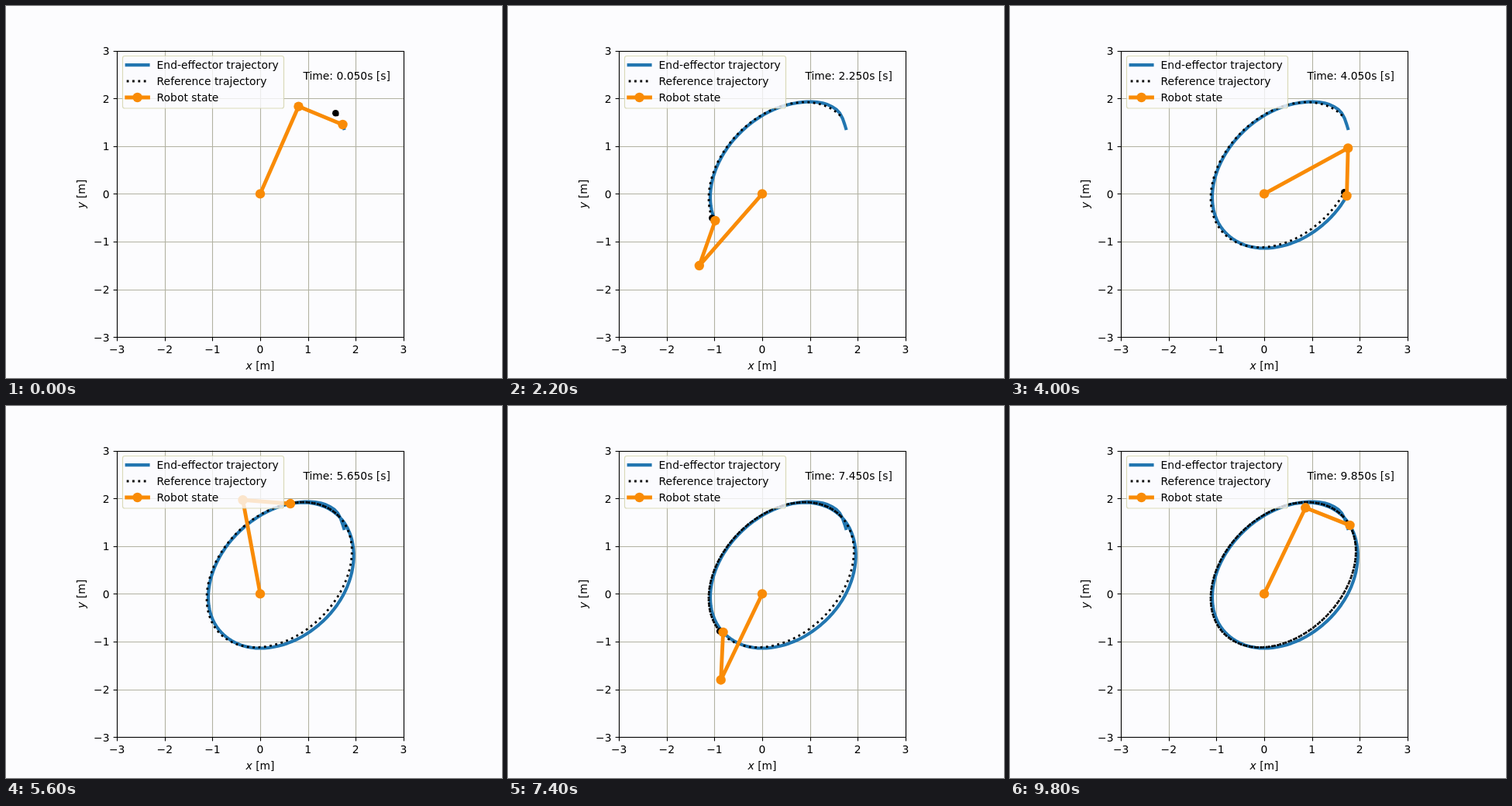
An HTML page with a canvas that plays this animation: 640x480 px, repeating every 10 s.

```html
<!DOCTYPE html>
<html lang="en">
<head>
<meta charset="utf-8">
<title>Two-link arm tracking an ellipse</title>
<style>
  html, body { margin: 0; width: 100%; height: 100%; overflow: hidden; background: #fcfcfe; }
  canvas { display: block; }
</style>
</head>
<body>
<canvas id="stage" width="640" height="480"></canvas>
<script>
const ctx = document.getElementById('stage').getContext('2d');
const PAPER = '#fcfcfe', BLUE = '#2276b0', ORANGE = '#f98b06', GRID = '#b2b2a2';
const SCALE = 61.6, CX = 328, CY = 242.4;      // pixels per metre, axes origin
const LEFT = 143.2, RIGHT = 512.8, TOP = 57.6, BOTTOM = 427.2;
const LOOP = 10000, STEP = 200, LAP = 5, DT = 0.05;
const FONT = '13.89px "DejaVu Sans", sans-serif';
const DOTS = [2.78, 4.58];

const toX = x => CX + SCALE * x;
const toY = y => CY - SCALE * y;
const snap = v => Math.round(v) + 0.5;

// Tracking error in pixels: [time, outward, along the path]
const startup = [[0, -6.6, -16.7], [.05, -5.4, -16.5], [.15, .6, -12], [.25, 2, -10.1],
                 [.35, 1.8, -7.4], [.45, .8, -4]];
const steady = [[.65, -.5, -1.8], [1.45, -1.3, 5.2], [2.45, -2.4, 4], [3.05, 1.2, -1.2],
                [3.55, 4.6, -2.3], [4.05, 5.1, -2.5], [4.85, .3, -1.2]];
const shifted = laps => steady.map(([t, n, s]) => [t + laps * LAP, n, s]);
const errorKeys = [...startup, ...steady, ...shifted(1), ...shifted(2)];

function slope(i, c) {
  const a = errorKeys[Math.max(i - 1, 0)], b = errorKeys[i + 1];
  return (b[c] - a[c]) / (b[0] - a[0]);
}

// Cubic Hermite interpolation of one error component
function trackingError(t, c) {
  let i = 0;
  while (errorKeys[i + 1][0] <= t) i++;
  const a = errorKeys[i], b = errorKeys[i + 1], h = b[0] - a[0], u = (t - a[0]) / h;
  return a[c] * (1 + 2 * u) * (1 - u) ** 2 + b[c] * u * u * (3 - 2 * u)
    + h * u * (1 - u) * (slope(i, c) * (1 - u) - slope(i + 1, c) * u);
}

// Ellipse with semi-axes 1.75 and 1.25, turned by 45 degrees
function reference(t) {
  const phase = 2 * Math.PI * t / LAP;
  const a = 1.75 * Math.SQRT1_2, b = 1.25 * Math.SQRT1_2;
  const cos = Math.cos(phase), sin = Math.sin(phase);
  const dx = -a * sin - b * cos, dy = a * sin - b * cos, speed = Math.hypot(dx, dy);
  return {
    x: toX(.4 + a * cos - b * sin),
    y: toY(.4 + a * cos + b * sin),
    tx: dx / speed, ty: dy / speed
  };
}

function endEffector(t) {
  const { x, y, tx, ty } = reference(t);
  const out = trackingError(t, 1), along = trackingError(t, 2);
  return { x: x + along * tx - out * ty, y: y + along * ty + out * tx };
}

// Inverse kinematics for links of 2 m and 1 m
function elbow(tip) {
  const x = (tip.x - CX) / SCALE, y = (CY - tip.y) / SCALE, r = Math.hypot(x, y);
  const angle = Math.atan2(y, x) + Math.acos(Math.min(1, (r * r + 3) / (4 * r)));
  return { x: toX(2 * Math.cos(angle)), y: toY(2 * Math.sin(angle)) };
}

function line(points, color, width, { dash = [], cap = 'butt' } = {}) {
  ctx.beginPath();
  points.forEach(p => ctx.lineTo(p.x, p.y));
  ctx.strokeStyle = color;
  ctx.lineWidth = width;
  ctx.lineCap = cap;
  ctx.lineJoin = 'round';
  ctx.setLineDash(dash);
  ctx.stroke();
  ctx.setLineDash([]);
}

const segment = (x1, y1, x2, y2, color, width, style) =>
  line([{ x: x1, y: y1 }, { x: x2, y: y2 }], color, width, style);

function disc({ x, y }, radius, color) {
  ctx.beginPath();
  ctx.arc(x, y, radius, 0, 2 * Math.PI);
  ctx.fillStyle = color;
  ctx.fill();
}

function text(string, x, y, align = 'left') {
  ctx.font = FONT;
  ctx.fillStyle = '#000';
  ctx.textAlign = align;
  ctx.fillText(string, x, y);
}

function axisLabel(letter, x, y, angle) {
  ctx.save();
  ctx.translate(x, y);
  ctx.rotate(angle);
  ctx.font = FONT;
  const rest = ' [m]', width = ctx.measureText(letter + rest).width;
  text(rest, width / 2, 0, 'right');
  ctx.textAlign = 'left';
  ctx.font = 'italic ' + FONT;
  ctx.fillText(letter, -width / 2, 0);
  ctx.restore();
}

function drawGrid() {
  for (let v = -2; v <= 2; v++) {
    segment(snap(toX(v)), TOP, snap(toX(v)), BOTTOM, GRID, 1.11);
    segment(LEFT, snap(toY(v)), RIGHT, snap(toY(v)), GRID, 1.11);
  }
}

function drawAxes() {
  for (let v = -3; v <= 3; v++) {
    const label = String(v).replace('-', '\u2212'), x = snap(toX(v)), y = snap(toY(v));
    segment(x, snap(BOTTOM), x, snap(BOTTOM) + 4.86, '#000', 1.11);
    segment(snap(LEFT) - 4.86, y, snap(LEFT), y, '#000', 1.11);
    text(label, toX(v), 447.6, 'center');
    text(label, 133.5, toY(v) + 5.3, 'right');
  }
  ctx.lineWidth = 1.11;
  ctx.strokeStyle = '#000';
  ctx.lineJoin = 'miter';
  ctx.strokeRect(snap(LEFT), snap(TOP), snap(RIGHT) - snap(LEFT), snap(BOTTOM) - snap(TOP));
  axisLabel('x', CX, 468.8, 0);
  axisLabel('y', 101.5, CY, -Math.PI / 2);
}

function drawLegend() {
  ctx.beginPath();
  ctx.roundRect(150.5, 64.5, 208, 67.5, 2.8);
  ctx.fillStyle = 'rgba(252,252,254,.8)';
  ctx.fill();
  ctx.strokeStyle = 'rgba(210,210,168,.8)';
  ctx.lineWidth = 1.2;
  ctx.stroke();
  const row = (y, label, ...style) => {
    segment(155.7, y, 183.5, y, ...style);
    text(label, 194.6, y + 4.9);
  };
  row(76.1, 'End-effector trajectory', BLUE, 4.17, { cap: 'square' });
  row(97, 'Reference trajectory', '#000', 2.78, { dash: DOTS });
  row(118, 'Robot state', ORANGE, 4.86, { cap: 'square' });
  disc({ x: 169.6, y: 118 }, 6.2, ORANGE);
}

function draw(time) {
  const now = DT + Math.floor(time % LOOP / STEP) * STEP / 1000;
  const samples = Array.from({ length: Math.round(now / DT) + 1 }, (_, i) => i * DT);
  const base = { x: CX, y: CY }, tip = endEffector(now), arm = [base, elbow(tip), tip];

  ctx.fillStyle = PAPER;
  ctx.fillRect(0, 0, 640, 480);
  drawGrid();
  line(samples.map(endEffector), BLUE, 4.17, { cap: 'square' });
  line(samples.map(reference), '#000', 2.78, { dash: DOTS });
  disc(reference(now), 4.3, '#000');
  line(arm, ORANGE, 4.86, { cap: 'square' });
  arm.forEach(joint => disc(joint, 6.2, ORANGE));
  drawAxes();
  text(`Time: ${now.toFixed(3)}s [s]`, 383.4, 94.7);
  drawLegend();
}

const begin = performance.now();
function tick() {
  draw(performance.now() - begin);
  requestAnimationFrame(tick);
}
tick();
</script>
</body>
</html>
```
